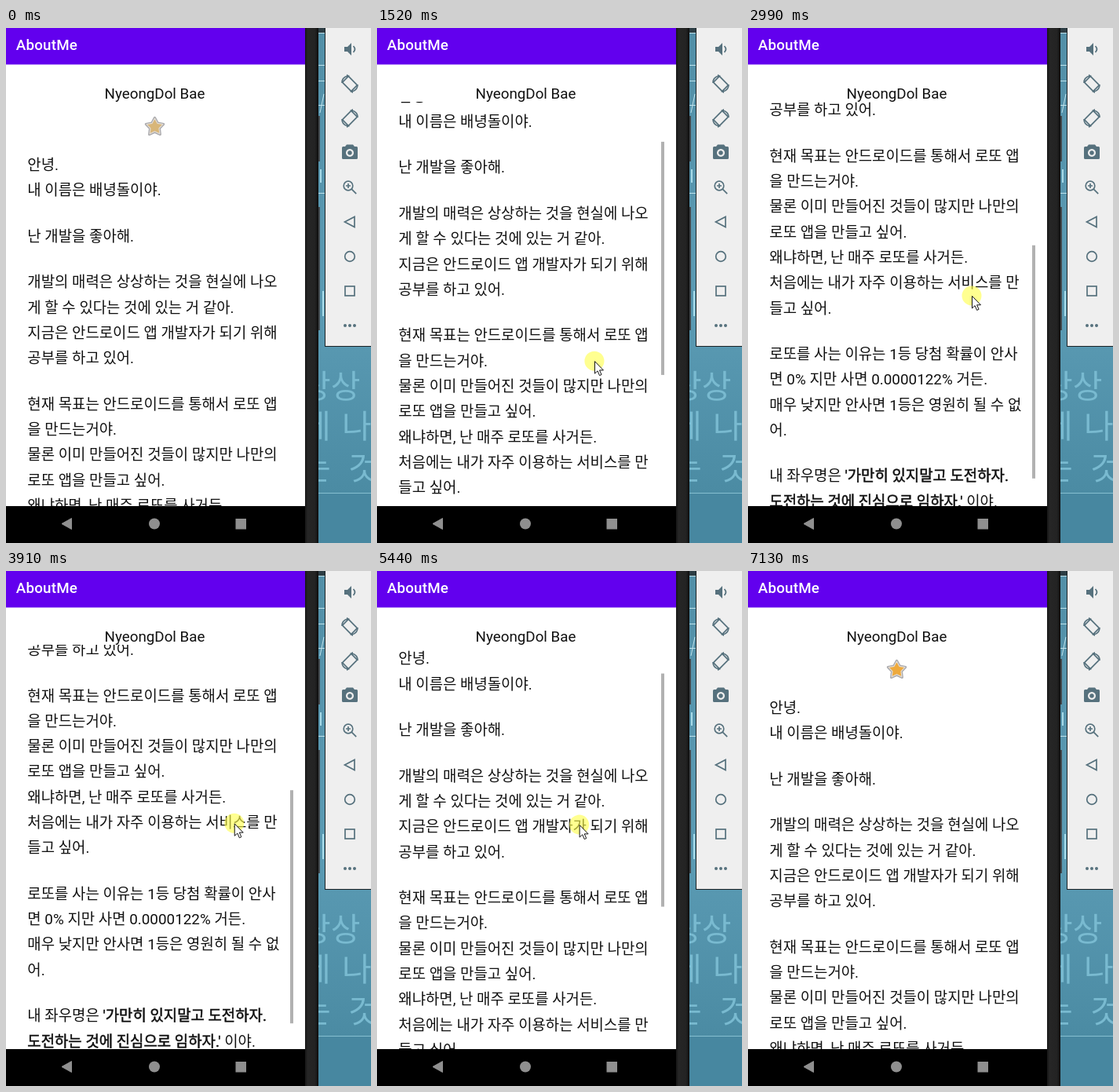
These frames come from a looping animation (465 by 656 pixels, 7530 ms). An HTML page:

```html
<!DOCTYPE html>
<html lang="ko">
<head>
<meta charset="utf-8">
<title>AboutMe</title>
<style>
html, body { margin: 0; width: 100%; height: 100%; overflow: hidden; background: #fff; }
svg { display: block; width: 465px; height: 656px; }
text { font-family: Roboto, "Noto Sans CJK KR", "Noto Sans CJK", sans-serif; white-space: pre; }
.body { font-size: 18.88px; fill: #111; }
.bold { stroke: #111; stroke-width: .55px; }
.wall { font-family: "Noto Sans CJK KR", "Noto Sans CJK", sans-serif; font-size: 41px; font-weight: 300; fill: #79bad0; }
.line { fill: none; stroke: #56717d; stroke-width: 1.7; }
.solid { fill: #56717d; }
</style>
</head>
<body>
<svg viewBox="0 0 465 656">
  <defs>
    <clipPath id="view"><rect y="94" width="381" height="515"/></clipPath>
    <linearGradient id="sea" x2="0" y2="1">
      <stop offset="0" stop-color="#528fa7"/><stop offset=".6" stop-color="#5b9bb4"/><stop offset="1" stop-color="#4b8ba3"/>
    </linearGradient>
    <linearGradient id="edge">
      <stop offset="0" stop-color="#161616"/><stop offset=".2" stop-color="#262626"/>
      <stop offset=".75" stop-color="#232323"/><stop offset="1" stop-color="#0d0d0d"/>
    </linearGradient>
  </defs>

  <!-- desktop behind the emulator -->
  <rect x="397" width="68" height="594" fill="url(#sea)"/>
  <rect x="397" y="593" width="68" height="63" fill="#4787a0"/>
  <path d="M397 592.5h68" stroke="#86bfd0"/>
  <rect x="397" width="10" height="6" fill="#2d3d44"/>
  <path d="M397 6.5h10M397 47.5h10M397 67.5h10M397 98.5h10M397 210.5h10M400 108l5-24" stroke="#bfe3ec" fill="none"/>
  <path d="M401 180v17M404 335v32" stroke="#a9dcea" stroke-width="2"/>
  <g class="wall">
    <text x="376" y="471">상상</text>
    <text x="376" y="522">에</text><text x="428" y="522">나</text>
    <text x="376" y="575">는</text><text x="436" y="575">것</text>
  </g>

  <!-- phone -->
  <rect x="381" width="17" height="656" fill="url(#edge)"/>
  <path d="M399 112v58M399 228v157" stroke="#43494d" stroke-width="2"/>
  <rect width="381" height="656" fill="#fff"/>
  <rect width="381" height="46.5" fill="#6200ee"/>
  <text x="12.7" y="28.3" font-size="18.8" font-weight="500" letter-spacing=".2" fill="#fff">AboutMe</text>
  <text x="189.5" y="89.7" font-size="18.8" text-anchor="middle" fill="#111">NyeongDol Bae</text>
  <g clip-path="url(#view)">
    <g id="page">
      <path id="rim" fill="#a9a9ad" stroke="#a9a9ad" stroke-width="3" stroke-linejoin="round"/>
      <path id="star" stroke="#e3dcd4" stroke-width="1.2" stroke-linejoin="round"/>
    </g>
    <rect id="bar" x="362" width="4" height="297" fill="#b1b1b1"/>
  </g>
  <rect y="609" width="381" height="47" fill="#000"/>
  <g fill="#8f8f8f">
    <path d="M71 631.5l12.500-7v14z" stroke="#8f8f8f" stroke-linejoin="round"/>
    <circle cx="189" cy="631.5" r="7"/>
    <rect x="292.5" y="625" width="13.5" height="13.5"/>
  </g>

  <!-- emulator toolbar -->
  <rect x="406" y="-1" width="60" height="407" fill="#1c2225"/>
  <rect x="407" width="58" height="405" fill="#efefef"/>
  <g transform="translate(438 27)"><path class="solid" d="M-7-3h4l5-5v16l-5-5h-4z"/><path class="line" d="M4.5-4q4 4 0 8"/></g>
  <g id="turn" transform="translate(438 71)">
    <rect class="line" x="-5.5" y="-8" width="11" height="16" rx="1" transform="rotate(-45)"/>
    <path class="line" d="M-10-1q0-7 7-9M10 1q0 7-7 9"/>
    <path class="solid" d="M-4-12v5l4-3zM4 12V7L0 10z"/>
  </g>
  <use href="#turn" transform="translate(876 44) scale(-1 1)"/>
  <path class="solid" fill-rule="evenodd" d="M432 151l2-2.500h8l2 2.500h2.500q1.500 0 1.500 1.500v13q0 1.500-1.500 1.500h-17q-1.500 0-1.500-1.500v-13q0-1.500 1.500-1.500zM438 154a5 5 0 1 0 .01 0zM438 156.200a2.800 2.800 0 1 1-.01 0z"/>
  <g class="line" transform="translate(436 201)"><circle r="5.8"/><path d="M-3 0h6M0-3v6M4.200 4.200l6 6"/></g>
  <g class="line">
    <path d="M431.500 247l12.500-6.500v13z"/>
    <circle cx="438" cy="291" r="6.300"/>
    <rect x="432" y="329" width="12" height="12"/>
  </g>
  <path d="M432 379h12.100" stroke="#56717d" stroke-width="4" stroke-linecap="round" stroke-dasharray="0 6"/>

  <g id="cursor">
    <circle id="press" r="12.5" fill="#ffff4c" opacity=".62"/>
    <path d="M.5.5v15.500l3.600-3.300 2.500 5.800 2.500-1.100-2.500-5.600h4.900z" fill="#fff" stroke="#111"/>
  </g>
</svg>
<script>
const $ = id => document.getElementById(id);
const clamp = (v, lo, hi) => Math.min(hi, Math.max(lo, v));
const mix = (a, b, p) => a + (b - a) * p;
const LOOP = 7530, START = 270, END = 7130, STEP = 70;
const MAX_SCROLL = 378, GLIDE = 200;

// "*" toggles bold
const bio = `안녕.
내 이름은 배녕돌이야.

난 개발을 좋아해.

개발의 매력은 상상하는 것을 현실에 나오
게 할 수 있다는 것에 있는 거 같아.
지금은 안드로이드 앱 개발자가 되기 위해
공부를 하고 있어.

현재 목표는 안드로이드를 통해서 로또 앱
을 만드는거야.
물론 이미 만들어진 것들이 많지만 나만의
로또 앱을 만들고 싶어.
왜냐하면, 난 매주 로또를 사거든.
처음에는 내가 자주 이용하는 서비스를 만
들고 싶어.

로또를 사는 이유는 1등 당첨 확률이 안사
면 0% 지만 사면 0.0000122% 거든.
매우 낮지만 안사면 1등은 영원히 될 수 없
어.

내 좌우명은 *'가만히 있지말고 도전하자.*
*도전하는 것에 진심으로 임하자.'* 이야.`;

function svg(tag, attrs, parent) {
  const node = document.createElementNS("http://www.w3.org/2000/svg", tag);
  for (const key in attrs) node.setAttribute(key, attrs[key]);
  return parent.appendChild(node);
}

let lineY = 181;
for (const line of bio.split("\n")) {
  if (line) {
    const text = svg("text", { class: "body", x: 27.3, y: lineY }, $("page"));
    line.split("*").forEach((part, i) => {
      if (part) svg("tspan", i % 2 ? { class: "bold" } : {}, text).textContent = part;
    });
  }
  lineY += line ? 32.3 : 26.2;
}

function starPath(cx, cy, outer, inner) {
  const points = Array.from({ length: 10 }, (_, i) => {
    const r = i % 2 ? inner : outer, a = (i / 5 - .5) * Math.PI;
    return `${cx + r * Math.cos(a)} ${cy + r * Math.sin(a)}`;
  });
  return `M${points.join("L")}z`;
}
$("rim").setAttribute("d", starPath(189.5, 126, 11.8, 6.3));
$("star").setAttribute("d", starPath(189.5, 126, 11, 5.8));

// each swipe drags the page with the pointer, then lets it glide on
const swipes = [
  { from: { t: 1110, x: 297, y: 511.5 }, to: { t: 1740, x: 263, y: 363.5 }, glide: 58 },
  { from: { t: 2510, x: 290, y: 451 }, to: { t: 3280, x: 281, y: 253 }, glide: 0 },
  { from: { t: 3630, x: 291, y: 263.5 }, to: { t: 4400, x: 290, y: 479 }, glide: -27 },
  { from: { t: 5170, x: 256, y: 250 }, to: { t: 5730, x: 260, y: 430 }, glide: 0 }
];
const stops = [
  { t: START, x: 395, y: 646 },
  ...swipes.flatMap(s => [s.from, s.to]),
  { t: 6080, x: 18, y: 452 }, { t: 6220, x: 18, y: 450 },
  { t: 6600, x: 320, y: 56 }, { t: END, x: 435, y: 656 }
];

const dragEase = p => p ** 1.3;
const moveEase = p => p * p * p * (p * (6 * p - 15) + 10);
const pressed = t => swipes.some(s => t >= s.from.t && t < s.to.t);

function pointerAt(t) {
  const i = clamp(stops.findIndex(s => s.t > t), 1, stops.length - 1);
  const a = stops[i - 1], b = stops[i];
  const p = clamp((t - a.t) / (b.t - a.t), 0, 1);
  const e = (pressed(t) ? dragEase : moveEase)(p);
  return { x: mix(a.x, b.x, e), y: mix(a.y, b.y, e) };
}

function scrollAt(t) {
  let scroll = 0;
  for (const { from, to, glide } of swipes) {
    if (t < from.t) break;
    const p = clamp((t - from.t) / (to.t - from.t), 0, 1);
    scroll = clamp(scroll + (from.y - to.y) * dragEase(p), 0, MAX_SCROLL);
    scroll += glide * (1 - Math.exp(-Math.max(0, t - to.t) / GLIDE));
  }
  return scroll;
}

// the bar fades shortly after the page comes to rest
function barOpacity(t) {
  const last = swipes.filter(s => t > s.from.t - STEP / 2).pop();
  if (!last) return 0;
  const rest = last.to.t + (last.glide ? 4 * GLIDE : 0);
  return clamp((rest + 250 - t) / 200, 0, 1);
}

function draw(now) {
  const raw = now % LOOP;
  const t = raw < START ? 0 : START + STEP * Math.floor((raw - START + 12) / STEP);
  const scroll = scrollAt(t), { x, y } = pointerAt(t);
  $("page").setAttribute("transform", `translate(0 ${-scroll})`);
  $("bar").setAttribute("y", 94.5 + scroll * .577);
  $("bar").setAttribute("opacity", barOpacity(t));
  $("star").setAttribute("fill", t < LOOP / 2 ? "#d8b679" : "#eeaa3d");
  $("cursor").setAttribute("transform", `translate(${x} ${y})`);
  $("cursor").setAttribute("visibility", t >= START && t < END ? "visible" : "hidden");
  $("press").style.display = pressed(t) ? "" : "none";
}

const origin = performance.now();
function tick() {
  draw(performance.now() - origin);
  requestAnimationFrame(tick);
}
tick();
</script>
</body>
</html>
```
